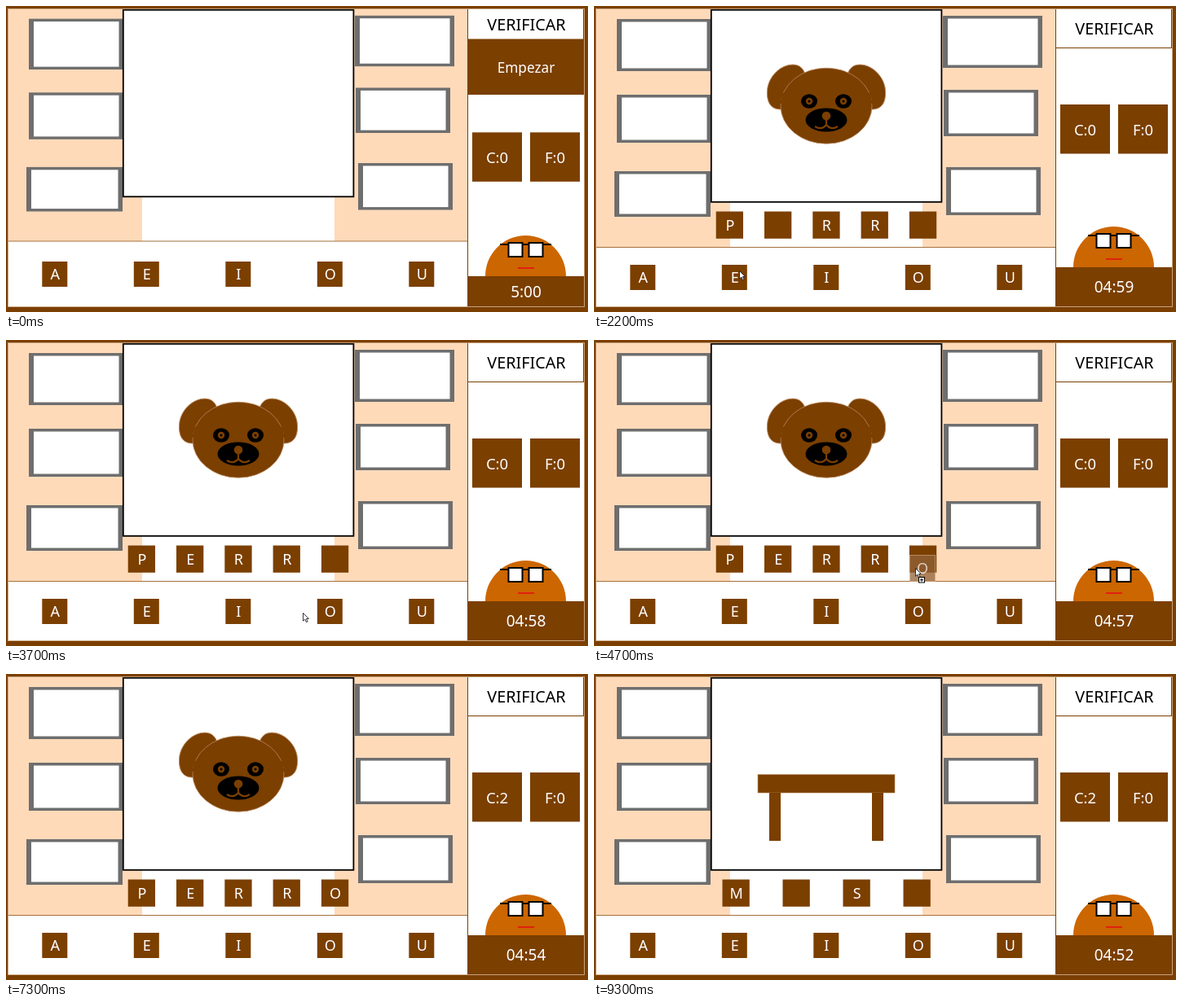
An HTML page that plays this animation: 714 px wide and 376 px high, repeating every 9500 ms.

```html
<!DOCTYPE html>
<html lang="es">
<head>
<meta charset="utf-8">
<title>Vocales</title>
<style>
  html, body { margin: 0; width: 100%; height: 100%; overflow: hidden; background: #7b3f00; }
  svg { display: block; width: 714px; height: 376px; }
  text { font-family: "Noto Sans", sans-serif; font-size: 19px; text-anchor: middle; fill: #fff; }
</style>
</head>
<body>
<svg id="stage" viewBox="0 0 714 376"></svg>
<script>
const LOOP = 9500, STEP = 100;
const BROWN = '#7b3f00', PEACH = '#ffdab9', GREY = '#6e6e6e', EDGE = '#b98a60';

const rect = (x, y, w, h, fill, more = '') =>
  `<rect x="${x}" y="${y}" width="${w}" height="${h}" fill="${fill}" ${more}/>`;
const label = (s, x, y, size = 19, more = '') =>
  `<text x="${x}" y="${y + size * 0.36}" style="font-size:${size}px" ${more}>${s}</text>`;
const tile = (s, x, y, size, more = '') =>
  `<g ${more}>${rect(x, y, size, size, BROWN)}${label(s, x + size / 2 + .5, y + size / 2, 18)}</g>`;
const group = (id, body) => `<g id="${id}">${body}</g>`;

// x, y, width, height of the wall frames
const FRAMES = [
  [28, 16, 116, 64], [28, 109, 116, 59], [25, 203, 118, 56],
  [428, 12, 122, 64], [429, 103, 116, 57], [432, 198, 116, 59]
];
const VOWELS = 'AEIOU';
const vowelX = i => 44.3 + i * 112.5;

function wall(bottom) {
  const frames = FRAMES.map(([x, y, w, h]) =>
    rect(x, y, w, h, GREY) + rect(x + 6, y + 3.5, w - 11.5, h - 7, '#fff')).join('');
  return `<g transform="translate(0 4) scale(1 ${(bottom - 4) / 292.5}) translate(0 -4)">
    ${rect(3, 4, 563, 292.5, PEACH)}${rect(167, 220, 236, 77, '#fff')}${frames}</g>`;
}

function face(base) {
  const lens = x => rect(x, -41, 17, 17, '#fff', 'stroke="#000" stroke-width="2"');
  return `<g transform="translate(0 ${base})">
    <path d="M588 0a49.5 50 0 0 1 99 0z" fill="#cc6600"/>
    <path d="M606 -39H669" stroke="#000" stroke-width="2"/>${lens(616.5)}${lens(641.5)}
    <path d="M628 -10H648" stroke="#e02010" stroke-width="2"/></g>`;
}

// Layout shared by the start screen and the game
function screen(id, o) {
  const vowels = [...VOWELS].map((v, i) => tile(v, vowelX(i), o.vowelY, 31)).join('');
  const score = (s, x, n) => rect(x, o.scoreY, 61, 60.5, BROWN) + label(s, x + 30.5, o.scoreY + 31, 18.5, `id="${id}${n}"`);
  return group(id,
    wall(o.wall) +
    rect(143.8, 4.8, 282.6, o.panel - 5, '#fff', 'stroke="#000" stroke-width="1.8"') +
    rect(3, o.wall, 563, 370 - o.wall, '#fff') +
    `<path d="M3 ${o.wall}H566" stroke="#a5703c"/>` + vowels +
    rect(567, 4, 142, o.base - 4, '#fff') +
    `<path d="M566.5 4V370M567 ${o.check}H709M708.5 4V${o.check}" stroke="${BROWN}" fill="none"/>` +
    label('VERIFICAR', 638.5, o.check / 2 + 2.5, 19.8, 'fill="#000" class="dark"') +
    score('C:0', 572, 'C') + score('F:0', 643, 'F') + face(o.base) +
    rect(567, o.base, 142, 370 - o.base, BROWN) +
    label('5:00', 638, (o.base + 370) / 2, 19, `id="${id}Time"`));
}

const dogSide = `
  <path d="M231 127C214 128 211 114 213 100C217 80 238 67 252 74Q258 78 259 85L250 118Z" fill="${BROWN}" stroke="${EDGE}"/>`;
const dogEye = `<ellipse cx="264" cy="117" rx="10" ry="8.7"/><circle cx="264" cy="117" r="4.2" fill="${BROWN}"/>
  <circle cx="264" cy="117" r="1.5"/>`;
const both = s => `${s}<g transform="translate(570 0) scale(-1 1)">${s}</g>`;
const dog = both(dogSide) + `
  <ellipse cx="285" cy="122.7" rx="56" ry="46.5" fill="${BROWN}" stroke="${EDGE}" stroke-width=".8"/>
  <path d="M228 121L231 108L259 84L272 90ZM342 121L339 108L311 84L298 90Z" fill="${BROWN}"/>
  ${both(dogEye)}<ellipse cx="285" cy="140" rx="25.5" ry="14.5"/>
  <circle cx="285" cy="135" r="5.3" fill="${BROWN}"/>
  <path d="M285 138V146M271 148Q279 153 285 146Q291 153 299 148" fill="none" stroke="${BROWN}" stroke-width="2.2"/>`;
const table = rect(201, 123.5, 168, 22.5, BROWN, `stroke="${EDGE}" stroke-width=".6"`) +
  rect(215, 146, 14, 59, BROWN) + rect(341, 146, 14, 59, BROWN);

const word = (s, x, gap, id) =>
  [...s].map((c, i) => tile(c, x + i * gap, 252.5, 33.3, `id="${id}${i}"`)).join('');

const ghost = (id, s) => `<g id="${id}" opacity=".75">
  ${rect(.5, .5, 31, 32, '#92623a', 'stroke="#c9a27c"')}${label(s, 16, 16.5, 18)}</g>`;
const cursor = group('cursor', `
  <path d="M.5 .5V10.2L2.8 8.1L4.4 11.8L6 11L4.5 7.5H7.4Z" fill="#fff" stroke="#222" stroke-width=".9"/>
  <g id="badge">${rect(4.5, 11.5, 7, 6.5, '#fff', 'stroke="#000"')}
  <path d="M6 14.8H10M8 12.8V16.8" stroke="#000"/></g>`);

const stage = document.getElementById('stage');
stage.innerHTML =
  rect(0, 0, 714, 376, BROWN) +
  screen('start', { wall: 289, panel: 234.5, vowelY: 314, check: 41, scoreY: 155.3, base: 332 }) +
  group('empty', rect(567, 41, 142, 68, BROWN) + label('Empezar', 638, 75.5, 17.2)) +
  screen('play', { wall: 296.5, panel: 241, vowelY: 318, check: 51.5, scoreY: 121, base: 321 }) +
  group('dog', dog + word('PERRO', 149.7, 59.3, 'p')) +
  group('table', table + word('M S ', 157.5, 74, 'm')) +
  rect(2.5, 3.5, 707, 366, 'none', 'stroke="#cfae8c" stroke-width=".9"') +
  ghost('ghostE', 'E') + ghost('ghostO', 'O') + cursor;

const $ = id => document.getElementById(id);
document.querySelectorAll('.dark').forEach(e => e.style.fill = '#000');

// time, x, y of the pointer
const PATH = [
  [0, 647, 84], [1000, 647, 84], [2200, 178, 325], [2400, 178, 325], [2900, 228, 268],
  [3000, 228, 268], [3700, 364, 335], [3900, 389, 334], [4300, 389, 334], [4700, 394, 280],
  [4900, 395, 274], [5300, 395, 274], [6100, 650, 28], [6800, 650, 28], [7200, 657, -14]
];
function pointer(t) {
  const i = PATH.findIndex(k => k[0] > t);
  if (i < 0) return PATH[PATH.length - 1].slice(1);
  const [t0, x0, y0] = PATH[i - 1], [t1, x1, y1] = PATH[i];
  const u = (t - t0) / (t1 - t0), e = u * u * (3 - 2 * u);
  return [x0 + (x1 - x0) * e, y0 + (y1 - y0) * e];
}

const show = (id, on) => $(id).style.display = on ? '' : 'none';
const move = (id, x, y) => $(id).setAttribute('transform', `translate(${x} ${y})`);
const letter = (id, s) => $(id).querySelector('text').textContent = s;

function render(t) {
  const playing = t >= 1000, next = t >= 8900;
  show('start', !playing);
  show('empty', !playing);
  show('play', playing);
  show('dog', playing && !next);
  show('table', next);
  letter('p1', t >= 2900 ? 'E' : '');
  letter('p4', t >= 4900 ? 'O' : '');
  $('playC').textContent = t >= 6900 ? 'C:2' : 'C:0';
  $('playTime').textContent = t < 2000 ? '5:00' : '04:' + (61 - Math.floor(t / 1000));

  const [x, y] = pointer(t);
  const dragE = t > 2400 && t < 2900, dragO = t > 4300 && t < 4900;
  show('cursor', t >= 100 && t < 7200);
  show('badge', dragE || dragO);
  show('ghostE', dragE);
  show('ghostO', dragO);
  move('cursor', x, y);
  move('ghostE', x - 21, y - 7);
  move('ghostO', x - 7, y - 16);
}

const begin = performance.now();
function tick() {
  const t = (performance.now() - begin) % LOOP;
  render(Math.floor(t / STEP) * STEP);
  requestAnimationFrame(tick);
}
tick();
</script>
</body>
</html>
```
